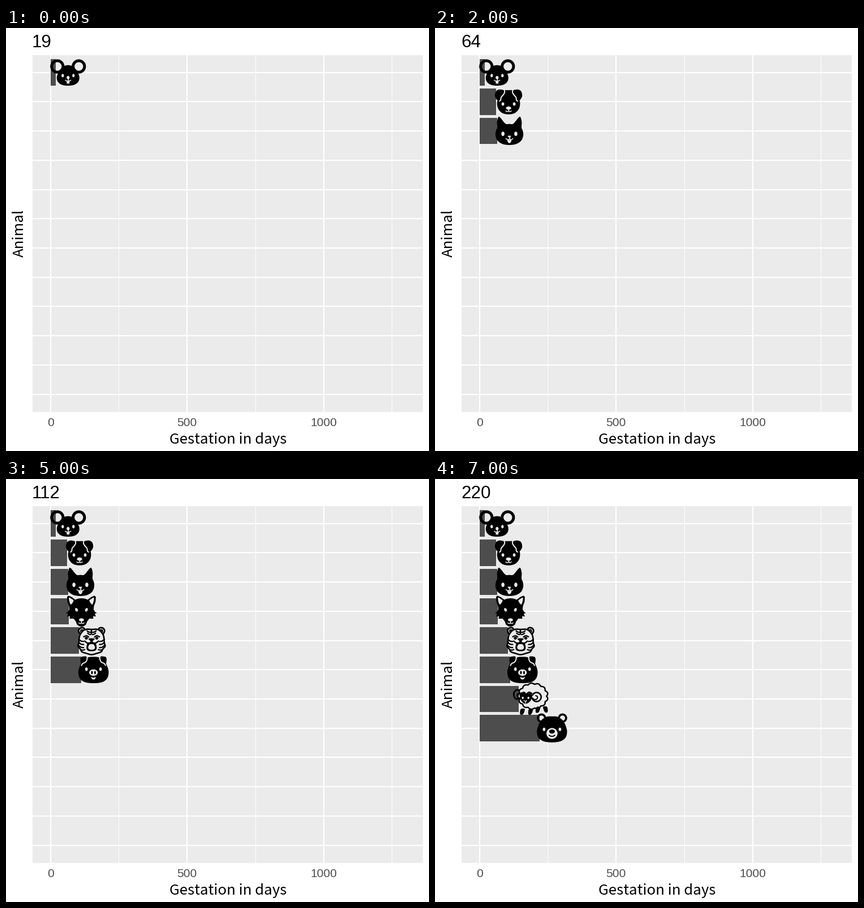
Animation of 748 by 748 pixels, one loop 8000 ms. Source, as a matplotlib script:

```python
import numpy as np
import matplotlib.pyplot as plt
from matplotlib.animation import FuncAnimation
from matplotlib.patches import Ellipse, Polygon, Rectangle

SIZE, DPI = 748, 100
PT = 72 / DPI                      # points per pixel
PANEL, INK, BAR = "#EBEBEB", "black", "#4D4D4D"
LEFT, RIGHT, TOP, BOTTOM = 47.4, 736.8, 48, 679
X0, DAY = 78.6, 0.4831             # pixel of day 0, pixels per day
Y0, ROW = 78.7, 51.72              # first row, row spacing
DAYS = [19, 61, 64, 68, 105, 112, 144, 220]

fig = plt.figure(figsize=(SIZE / DPI, SIZE / DPI), dpi=DPI, facecolor="white")
ax = fig.add_axes([0, 0, 1, 1])
ax.set_xlim(0, SIZE)
ax.set_ylim(SIZE, 0)
ax.axis("off")


def spline(pts, closed=True, n=10):
    """Catmull-Rom curve through the points."""
    p = np.array(pts, float)
    if closed:
        p = np.vstack([p[-1], p, p[:2]])
    else:
        p = np.vstack([p[0], p, p[-1]])
    t = np.linspace(0, 1, n, endpoint=False)[:, None]
    out = []
    for a, b, c, d in zip(p, p[1:], p[2:], p[3:]):
        out.append(0.5 * (2 * b + (c - a) * t + (2 * a - 5 * b + 4 * c - d) * t**2
                          + (3 * b - a - 3 * c + d) * t**3))
    if not closed:
        out.append(p[-1:])
    return np.vstack(out)


def mirror(half):
    """Close a right-hand outline that runs from top centre to bottom centre."""
    return list(half) + [(-x, y) for x, y in half[-2:0:-1]]


class Pen:
    """Draws in pixels around a centre and collects the artists."""

    def __init__(self, cx, cy):
        self.o = np.array([cx, cy])
        self.parts = []

    def keep(self, artist):
        artist.set_zorder(3)
        self.parts.append(artist)

    def fill(self, pts, color=INK, smooth=True):
        pts = spline(pts) if smooth else np.array(pts, float)
        self.keep(ax.add_patch(Polygon(pts + self.o, closed=True, fc=color, lw=0)))

    def dot(self, x, y, rx, ry, color=PANEL, angle=0):
        self.keep(ax.add_patch(Ellipse(self.o + (x, y), 2 * rx, 2 * ry,
                                       angle=angle, fc=color, lw=0)))

    def ring(self, x, y, r, w):
        self.keep(ax.add_patch(Ellipse(self.o + (x, y), 2 * r, 2 * r,
                                       fill=False, ec=INK, lw=w * PT)))

    def line(self, pts, w=2, color=INK, closed=False):
        p = spline(pts, closed) + self.o
        if closed:
            p = np.vstack([p, p[:1]])
        self.keep(ax.plot(p[:, 0], p[:, 1], color=color, lw=w * PT,
                          solid_capstyle="round")[0])

    def both(self, pts, draw, **kw):
        for s in (1, -1):
            draw([(s * x, y) for x, y in pts], **kw)

    def eyes(self, x, y, rx, ry, tilt=0, color=PANEL):
        for s in (1, -1):
            self.dot(s * x, y, rx, ry, color, s * tilt)

    def muzzle(self, y, rx=4.6, ry=2.9, drop=6, wide=5):
        """Light nose with a stem and a double-curved mouth."""
        self.dot(0, y, rx, ry)
        self.line([(0, y), (0, y + drop - 1)], 1.4, PANEL)
        self.both([(0, y + drop - 1), (wide * .5, y + drop + .3), (wide, y + drop - 1)],
                  self.line, w=1.5, color=PANEL)


def mouse(p):
    for s in (1, -1):
        p.ring(s * 19, -10.7, 10.1, 5)
    p.fill(mirror([(0, -13), (8, -11), (14, -5), (18, 2), (20, 9),
                   (18, 16.5), (11, 21.7), (0, 23.3)]))
    p.eyes(9.5, 5.5, 2.2, 3)
    p.dot(0, 9, 2.6, 3)
    p.line([(0, 9), (0, 15)], 1.4, PANEL)
    p.line([(-5, 13.5), (-2.5, 15), (0, 14.6), (2.5, 15), (5, 13.5)], 1.5, PANEL)
    p.fill([(-2.6, 15.5), (2.6, 15.5), (2.2, 19.6), (-2.2, 19.6)], PANEL, False)


def dog(p):
    p.fill(mirror([(0, -20.5), (9, -20), (16, -15), (19, -5), (20.3, 4),
                   (18, 13), (11, 20), (0, 22.3)]))
    p.both([(13, -21.5), (7.5, -19.5), (8.5, -13), (12, -8), (15, -3),
            (20, -3), (24, -10), (22.5, -18), (18, -21.3)], p.fill)
    p.both([(7.5, -21), (7, -16.5), (10, -11.5), (13, -8), (14, -3), (16, -1.2)],
           p.line, w=2, color=PANEL)
    p.eyes(10, 4, 2.4, 3)
    p.muzzle(11.2)


def cat(p):
    p.fill(mirror([(0, -12.5), (7, -13), (16, -23.5), (19.5, -24.6), (21.8, -16),
                   (21.5, -6), (23.8, 0), (24.5, 8), (21, 17), (12, 23), (0, 24.7)]))
    p.eyes(11.4, 5, 2.8, 3.9)
    p.fill([(-3, 8.7), (3, 8.7), (0, 12)], PANEL)
    p.line([(0, 11), (0, 14)], 1.3, PANEL)
    p.both([(0, 14), (3.2, 15.2), (6.3, 13.4)], p.line, w=1.5, color=PANEL)
    p.fill([(-3.4, 16), (3.4, 16), (2.2, 20.3), (0, 21.5), (-2.2, 20.3)], PANEL)


def fox(p):
    p.fill(mirror([(0, -23), (6, -22.3), (11, -20.5), (17, -25), (23, -27.6),
                   (25.4, -25.5), (25, -17), (22, -9), (21.5, -3), (24, 1), (27.3, 3.3),
                   (23.5, 4.2), (25.5, 9.3), (20.5, 8.6), (21, 13.2), (14, 13),
                   (10, 18), (8, 23.5), (4, 26.5), (0, 27.2)]), smooth=False)
    p.both([(22, -24), (17, -21.5), (14, -18.5), (18.5, -12), (21, -16)],
           p.fill, color=PANEL)
    p.eyes(8.8, -2.6, 2.3, 3.3, tilt=25)
    p.muzzle(15.2, 4.4, 2.7, 6.3, 4.6)


def tiger(p):
    p.line(mirror([(0, -19.5), (8, -20), (14, -18), (20, -11), (22, -4), (22.5, 4),
                   (24, 10), (20, 15), (17, 20), (10, 22.5), (0, 25)]), 2.6, closed=True)
    for s in (1, -1):
        p.line([(s * 12, -19), (s * 14.5, -22.3), (s * 20, -22), (s * 23, -17.5),
                (s * 21, -12)], 2.8)
    p.both([(15.5, -18.5), (18.5, -18.5), (19, -15.5)], p.line, w=2.4)
    p.line([(0, -19), (0, -12)], 2.4)
    for y, x in ((-16, 8), (-12, 7)):
        p.both([(1.5, y + 1.5), (x * .6, y + 1), (x, y - 1)], p.line, w=2.3)
    p.both([(5, -6), (9, -8.5), (14, -6.5)], p.line, w=2.2)
    p.eyes(9.2, -4.2, 2.7, 2.6, color=INK)
    p.fill([(-5.5, -3), (0, -4), (5.5, -3), (2.5, .5), (0, 2), (-2.5, .5)])
    p.both([(0, 1), (3, 4.3), (8, 4.2), (12, 1)], p.line, w=2.4)
    p.fill([(-6, 4), (6, 4), (9, 12), (7, 17.5), (0, 19), (-7, 17.5), (-9, 12)])
    p.fill([(-3.5, 7), (3.5, 7), (6, 12.5), (4, 15.6), (0, 16.3), (-4, 15.6), (-6, 12.5)],
           PANEL)
    for y in (0, 5.5, 11):
        p.both([(22.5, y - 2), (18.5, y + 1), (14, y + 1.6)], p.line, w=2.3)
    p.both([(19, 16.5), (15, 17), (12, 16)], p.line, w=2.2)


def pig(p):
    p.fill(mirror([(0, -22.8), (9, -22), (17, -17.5), (23.5, -8), (26.8, 4),
                   (24, 15.5), (15, 22), (0, 23.7)]))
    p.both([(12, -22.5), (18, -23.5), (22.5, -21.5), (23, -15), (21, -9),
            (15, -12)], p.fill)
    p.both([(11, -24), (11.5, -18), (14, -13.5), (19, -11), (21.3, -7.5)],
           p.line, w=2, color=PANEL)
    p.eyes(12.5, -1, 2.4, 3.2)
    p.dot(0, 5, 7.6, 5.7)
    p.eyes(2.7, 5, 1.5, 3, color=INK)
    p.fill([(-4.2, 13.2), (0, 14), (4.2, 13.2), (2.5, 16.4), (0, 17.3), (-2.5, 16.4)],
           PANEL)


def sheep(p):
    a = np.linspace(0, 2 * np.pi, 160, endpoint=False)
    r = 0.91 + 0.1 * np.abs(np.sin(6.5 * a))
    p.line(np.c_[3 + 26.5 * r * np.cos(a), -5 + 23 * r * np.sin(a)], 2.4, closed=True)
    for x, y in ((-15.5, 18), (-1, 18), (12, 14.5), (24, 14)):
        d = -2 if x < 20 else 2
        p.fill([(x - 3, y), (x + 4, y), (x + 3 + d, y + 9), (x - 2 + d, y + 9)])
    p.line([(-20, -1.5), (-26, 0), (-30, -4), (-30.5, -11), (-26, -16), (-21, -15)], 2.8)
    p.line([(-24, -3), (-25, -8), (-21, -10)], 2.2)
    p.fill([(-20, -10), (-14, -12), (-8, -9), (-2, -11), (2, -6), (0, 1),
            (-4, 6), (-10, 8.5), (-16, 5), (-20, -2)])
    p.line([(-21, -11), (-17, -9), (-13, -12), (-9, -9), (-4, -12), (1, -10)], 2.2)
    p.dot(-15, -2, 1.7, 2)
    p.dot(-5, -2, 1.7, 2)
    p.line([(-13, 2.5), (-10.5, 4.2), (-8, 2.5)], 1.3, PANEL)
    p.line([(-10.5, 4.2), (-10.5, 6.5)], 1.3, PANEL)
    t = np.linspace(-2.7, 2.9, 20)
    p.dot(9.5, -3.5, 7.8, 7.8)
    p.line(np.c_[9.5 + 8 * np.cos(t), -3.5 + 8 * np.sin(t)], 2.6)
    p.line([(2, -1.5), (6, 1), (10, 0), (11, -4), (8, -6)], 2)


def bear(p):
    for s in (1, -1):
        p.ring(s * 18.6, -18, 6.4, 3.6)
    p.fill(mirror([(0, -21), (10, -20.2), (19, -14), (24, -5), (26.6, 6),
                   (24, 16.5), (15, 23), (0, 25)]))
    p.eyes(14, 2, 2.4, 3.1)
    p.dot(0, 9.2, 9.8, 9.6)
    p.dot(0, 5.8, 5, 3.6, INK)
    p.line([(-5, 12.2), (-2.5, 14), (0, 14.2), (2.5, 14), (5, 12.2)], 1.9)


def text(x, y, s, px, font, color=INK, **kw):
    kw = {"ha": "center", "va": "baseline", **kw}
    return ax.text(x, y, s, fontsize=px * PT, family=font, color=color, **kw)


def rule(xs, ys, w):
    ax.plot(xs, ys, color="white", lw=w * PT, solid_capstyle="butt", zorder=1)


def backdrop():
    ax.add_patch(Rectangle((LEFT, TOP), RIGHT - LEFT, BOTTOM - TOP,
                           fc=PANEL, lw=0, zorder=0))
    for day in range(0, 1251, 250):
        x = X0 + day * DAY
        major = day % 500 == 0
        rule([x, x], [TOP, BOTTOM], 2.1 if major else 1.05)
        if major:
            text(x, 704, str(day), 21, "Liberation Sans", BAR)
    for k in range(12):
        y = Y0 + k * ROW
        rule([LEFT, RIGHT], [y, y], 2.1)
    text(392.5, 735, "Gestation in days", 25.8, "Noto Sans CJK JP")
    text(31, 363, "Animal", 25.8, "Noto Sans CJK JP",
         rotation=90, rotation_mode="anchor")


def animal(k, draw):
    y, w = Y0 + k * ROW, DAYS[k] * DAY
    bar = ax.add_patch(Rectangle((X0, y - .45 * ROW), w, .9 * ROW,
                                 fc=BAR, lw=0, zorder=2))
    pen = Pen(X0 + w + 22, y)
    draw(pen)
    return [bar] + pen.parts


backdrop()
title = text(46, 34.3, "", 31.4, "Liberation Sans", ha="left")
rows = [animal(k, draw) for k, draw in
        enumerate([mouse, dog, cat, fox, tiger, pig, sheep, bear])]


def update(i):
    title.set_text(str(DAYS[i]))
    for k, parts in enumerate(rows):
        for part in parts:
            part.set_visible(k <= i)
    return []


anim = FuncAnimation(fig, update, frames=len(DAYS), interval=1000,
                     init_func=lambda: [], repeat=True, repeat_delay=0, blit=False)
plt.show()
```
